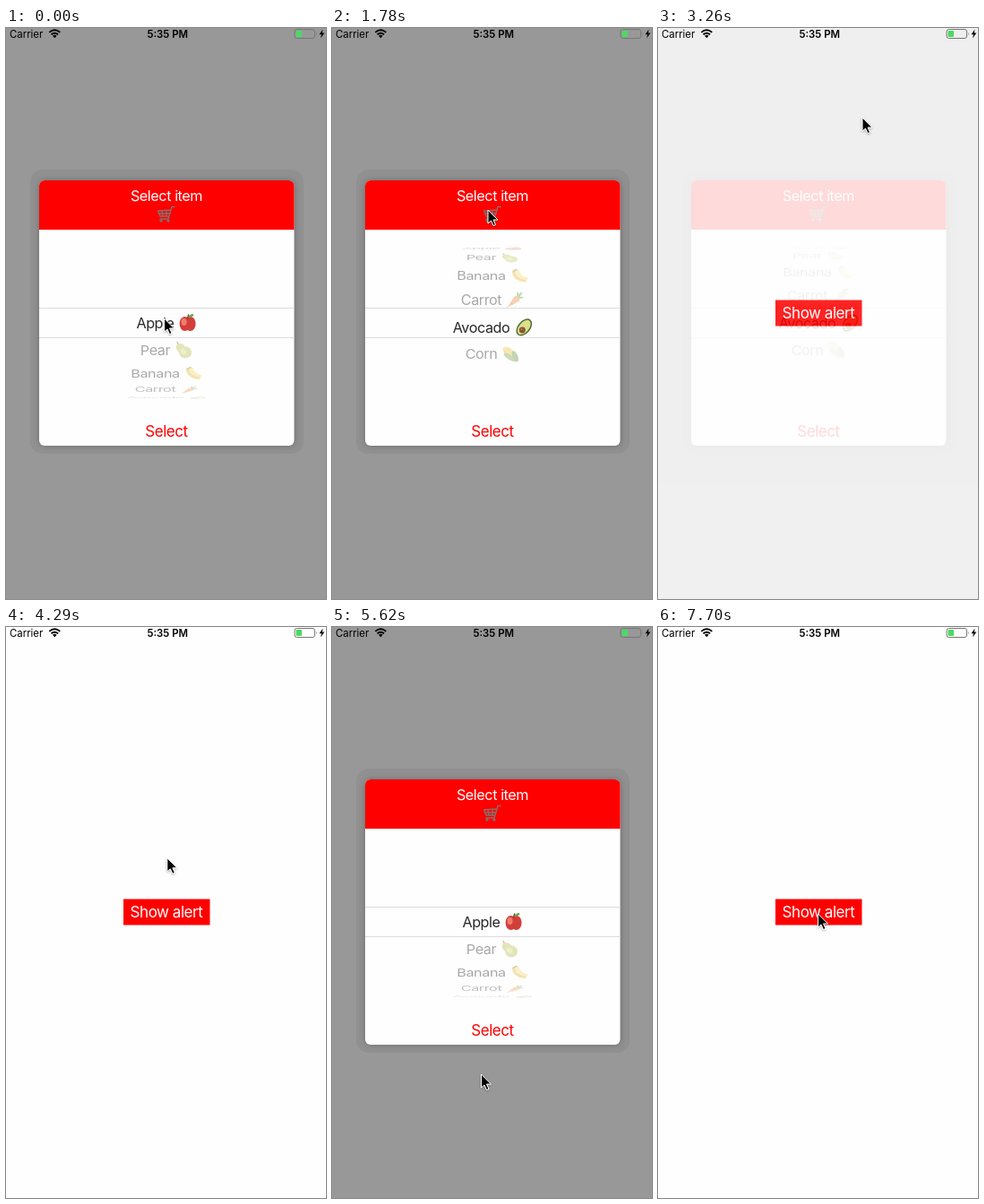
Recreate the animation shown at these times as an HTML page. Size 357 by 637 pixels, loop 8000 ms.

```html
<!DOCTYPE html>
<html lang="en">
<head>
<meta charset="utf-8">
<title>Item picker alert</title>
<style>
  html, body { margin: 0; width: 100%; height: 100%; overflow: hidden; background: #fefefe; }
  svg { display: block; width: 100vw; height: 100vh; }
  text { font-family: Inter, Roboto, "Liberation Sans", sans-serif; font-size: 16.2px; letter-spacing: -.027em; }
  .mid { text-anchor: middle; }
  .big { font-size: 17px; }
  .bar { font-size: 11.4px; letter-spacing: 0; }
</style>
</head>
<body>
<svg viewBox="0 0 357 637">
  <defs>
    <filter id="soft" x="-20%" y="-20%" width="140%" height="140%"><feGaussianBlur stdDeviation="3"/></filter>
    <filter id="drop" x="-50%" y="-50%" width="200%" height="200%">
      <feDropShadow dx="0" dy="1" stdDeviation=".8" flood-opacity=".35"/>
    </filter>
  </defs>

  <rect width="357" height="637" fill="#fefefe"/>
  <rect x="131" y="303.5" width="96.5" height="29" fill="#fe0000"/>
  <text class="mid big" x="179" y="324" fill="#fff">Show alert</text>

  <g id="alert">
    <rect width="357" height="637" fill="#989898"/>
    <rect x="27" y="158" width="305" height="317" rx="14" opacity=".055"/>
    <rect x="37" y="170" width="285" height="296" rx="7" opacity=".25" filter="url(#soft)"/>
    <rect x="37" y="170" width="284.5" height="296" rx="6" fill="#fefefe"/>
    <path d="M37 225V176a6 6 0 0 1 6-6H315.5a6 6 0 0 1 6 6V225Z" fill="#fe0000"/>
    <text class="mid" x="179" y="193.3" fill="#fff">Select item</text>
    <g fill="none" stroke="#85706c" stroke-width="1.3" stroke-linecap="round" stroke-linejoin="round">
      <path d="M188 199.500H185L181 213H172M184 203L169.500 204L172 210H182"/>
      <path d="M171 207H183M174 204L175 210M179 204V210"/>
      <circle cx="173" cy="215" r="1"/><circle cx="181" cy="215" r="1"/>
    </g>
    <path d="M37 312.5H321.5M37 345.5H321.5" stroke="#dcdcdc"/>
    <g id="wheel"></g>
    <text class="mid big" x="179" y="456" fill="#fe0000">Select</text>
  </g>

  <text class="bar" x="4" y="11">Carrier</text>
  <g fill="none" stroke="#000" stroke-width="1.9">
    <path d="M48.300 4.900Q54.300 -.3 60.300 4.900M50.500 7.300Q54.300 4 58.100 7.300"/>
    <path d="M52 8.800Q54.300 6.800 56.600 8.800L54.300 11.300Z" fill="#000" stroke="none"/>
  </g>
  <text class="bar mid" x="180.3" y="11" font-weight="600">5:35 PM</text>
  <rect x="322" y="1.5" width="22.5" height="10" rx="2.5" fill="none" stroke="#777"/>
  <rect x="323.5" y="3" width="6.5" height="7" rx="1" fill="#4cd964"/>
  <path d="M346 4.700q1.500 1.800 0 3.600Z" fill="#777"/>
  <path d="M353.500 1.500L349.500 7.200H352L351 11.500L355.300 5.600H352.700Z"/>

  <path id="cursor" d="M0 0V15L3.500 12L6 17.500L8.500 16.500L6 11H11Z" stroke="#fff" filter="url(#drop)"/>
</svg>

<script>
const LOOP = 8000, CENTER = 179, MID = 329, RADIUS = 84, ROW_ANGLE = 21 * Math.PI / 180;
const $ = id => document.getElementById(id);

const oval = (fill, rx, ry, x = 0, y = 0, turn = 0) =>
  `<ellipse rx="${rx}" ry="${ry}" fill="${fill}" transform="translate(${x} ${y}) rotate(${turn})"/>`;
const line = (color, width, d) =>
  `<path d="${d}" fill="none" stroke="${color}" stroke-width="${width}" stroke-linecap="round"/>`;

// Icons are drawn around 0,0
const items = {
  Apple: oval('#cf2a27', 6, 8, -3, 1) + oval('#cf2a27', 6, 8, 3, 1) + oval('#f0705c', 3, 4, -4, -1)
    + line('#5d3a1c', 1.4, 'M0-5L1-9') + oval('#5f9d35', 3, 1.5, 4, -8, -25),
  Pear: line('#6b4a22', 1.5, 'M-5-5L-7-9') + oval('#b3bb45', 5, 6, -3, -2, -40) + oval('#b3bb45', 7, 7, 2, 3)
    + oval('#d3d670', 3, 4, 0, 2, -40),
  Banana: line('#e3b52c', 4, 'M-6-6Q-5 5 6 7') + line('#f5d95c', 4, 'M-2-7Q0 2 8 4')
    + line('#8d7a2b', 2, 'M-6-7L-3-9'),
  Carrot: line('#5c9a38', 2.2, 'M3-3L3-8M3-3L7-8M3-3L8-3')
    + '<path d="M0-5Q6-4 5 1L-9 9Z" fill="#f08432"/>' + line('#c9601c', 1, 'M-2-1L0 1M-4 3L-3 5'),
  Avocado: oval('#3f5a23', 7, 11, 1, 0, 40) + oval('#d9dd7c', 5.5, 9.5, 1, 0, 40)
    + oval('#7b4322', 3.5, 3.5, -1, 3) + oval('#a8683c', 1.2, 1.2, -2, 2),
  Corn: oval('#f3c93b', 5, 10, -1, -1, -45) + line('#d49e25', .8, 'M-7-4L3 6M-4-7L6 3M-7-2L-2-7M-3 2L2-3')
    + oval('#76a03c', 3, 8, -1, 4, -55) + oval('#5f8a30', 3, 7, 5, 3, -20)
};

// Moves: first step, last step, step count, target values
const cursorMoves = [
  [600, 750, 2, 193, 262], [890, 1190, 3, 168, 332], [1480, 1780, 3, 174, 203],
  [2380, 2820, 4, 228, 100], [3700, 4440, 6, 163, 313], [5170, 5620, 4, 166.5, 499], [7100, 7700, 5, 178.5, 320]
];
const wheelMoves = [[1480, 1780, 3, 3.84], [2380, 2820, 4, 4], [4500, 4500, 1, 0]];
const fades = [[3110, 3400, 3, 0], [4730, 5030, 3, 1], [6510, 6660, 2, 0]];

const smooth = p => p * p * (3 - 2 * p);
const easeOut = p => 1 - (1 - p) ** 1.8;

// Follows the moves in turn, advancing in even steps
function sample(moves, start, t, ease) {
  let now = start;
  for (const [from, to, count, ...target] of moves) {
    if (t < from) break;
    const step = 1 + Math.floor((t - from) / (to - from || 1) * (count - 1) + 1e-6);
    const p = ease(Math.min(1, step / count));
    now = now.map((v, i) => v + (target[i] - v) * p);
  }
  return now;
}

$('wheel').innerHTML = Object.entries(items).map(([label, icon]) =>
  `<g><text y="5.8" fill="#111">${label}</text><g>${icon}</g></g>`).join('');
const rows = [...$('wheel').children];

for (const { children: [label, icon] } of rows) {
  const width = label.getComputedTextLength(), left = CENTER - (width + 25) / 2;
  label.setAttribute('x', left);
  icon.setAttribute('transform', `translate(${left + width + 15})`);
}

function turnWheel(pos) {
  rows.forEach((row, i) => {
    const angle = (i - pos) * ROW_ANGLE, depth = Math.cos(angle), y = RADIUS * Math.sin(angle);
    row.style.display = Math.abs(angle) < Math.PI / 2 ? '' : 'none';
    row.setAttribute('transform', `translate(0 ${MID + y}) scale(1 ${depth})`);
    row.setAttribute('opacity', Math.abs(y) < 16.5 ? .9 : .36 * Math.min(1, .3 + depth));
  });
}

function draw(t) {
  const [x, y] = sample(cursorMoves, [176.5, 324], t, smooth);
  $('cursor').setAttribute('transform', `translate(${x} ${y})`);
  turnWheel(sample(wheelMoves, [0], t, smooth)[0]);
  $('alert').setAttribute('opacity', sample(fades, [1], t, easeOut)[0]);
}

const began = performance.now();
function tick() {
  draw((performance.now() - began) % LOOP);
  requestAnimationFrame(tick);
}
tick();
</script>
</body>
</html>
```
